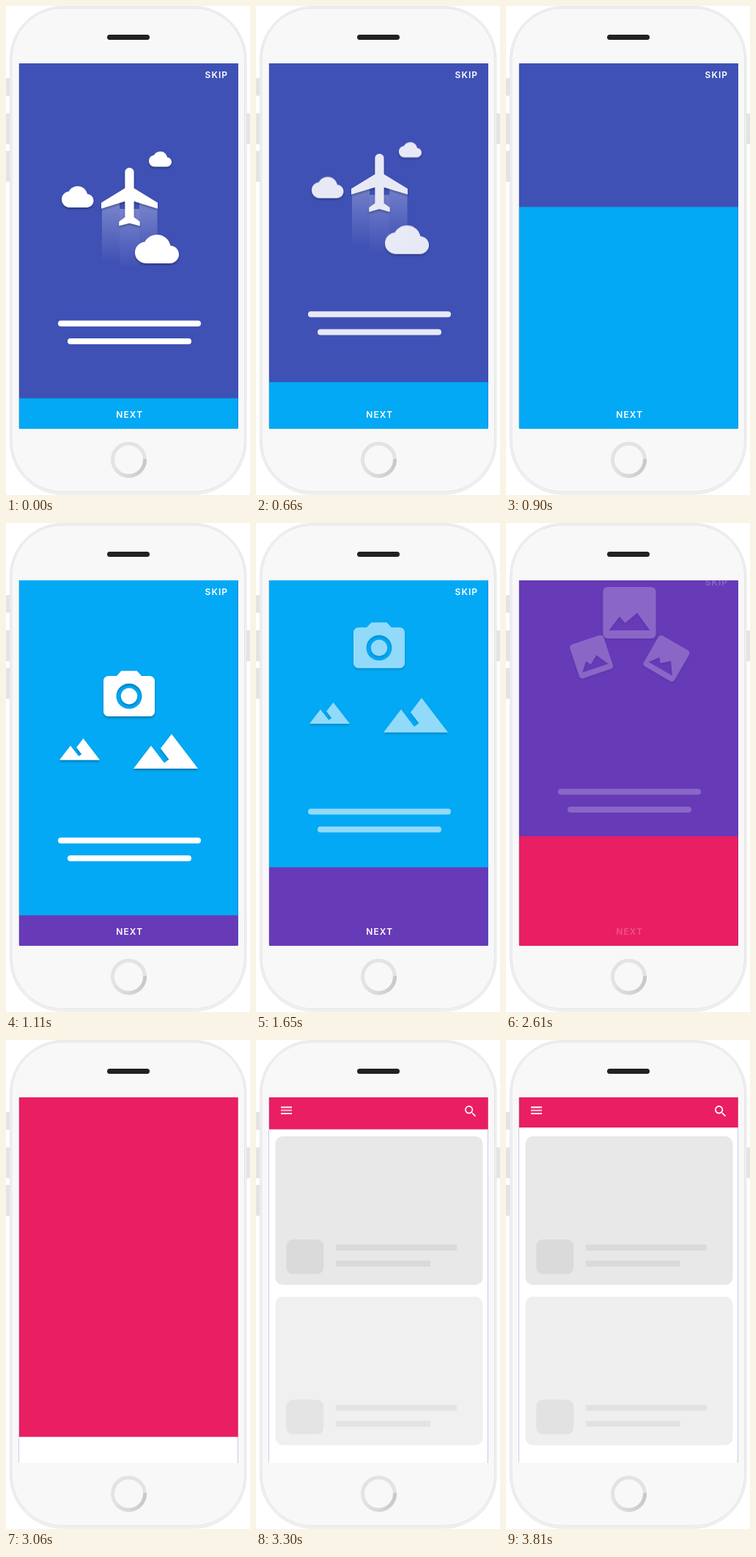
Animation of 333 by 665 pixels, one loop 4.43 s. Source, as an HTML page:

```html
<!DOCTYPE html>
<html lang="en">
<head>
<meta charset="utf-8">
<title>Onboarding</title>
<style>
  html, body { margin: 0; width: 100%; height: 100%; overflow: hidden; background: #fff; }
  svg { display: block; width: 100vw; height: 100vh; }
  text { font: 600 12px Inter, sans-serif; letter-spacing: 1.1px; fill: #fff; }
  .part { fill: #fff; }
</style>
</head>
<body>
<svg viewBox="0 0 333 665">
  <defs>
    <clipPath id="screen"><path d="M17.5 78H317V573q0 2-2 2H19.500q-2 0-2-2z"/></clipPath>
    <linearGradient id="trail" x1="0" y1="0" x2="0" y2="1">
      <stop offset="0" stop-color="#fff" stop-opacity=".3"/>
      <stop offset="1" stop-color="#fff" stop-opacity="0"/>
    </linearGradient>
    <linearGradient id="ring">
      <stop offset="0" stop-color="#e2e2e2"/>
      <stop offset="1" stop-color="#c9c9c9"/>
    </linearGradient>
    <filter id="shade" x="-20%" y="-20%" width="140%" height="150%">
      <feDropShadow dx="0" dy="2" stdDeviation="1.6" flood-color="#000" flood-opacity=".32"/>
    </filter>
    <path id="cloud" d="M19.35 10.04C18.67 6.59 15.64 4 12 4 9.11 4 6.6 5.64 5.35 8.04 2.34 8.36 0 10.91 0 14c0 3.31 2.69 6 6 6h13c2.76 0 5-2.24 5-5 0-2.64-2.05-4.78-4.65-4.96z"/>
    <path id="plane" d="M21 16v-2l-8-5V3.5c0-.83-.67-1.5-1.5-1.5S10 2.67 10 3.500V9l-8 5v2l8-2.500V19l-2 1.500V22l3.500-1 3.500 1v-1.500L13 19v-5.500l8 2.500z"/>
    <path id="camera" fill-rule="evenodd" d="M9 2L7.17 4H4c-1.1 0-2 .9-2 2v12c0 1.1.9 2 2 2h16c1.1 0 2-.9 2-2V6c0-1.1-.9-2-2-2h-3.17L15 2H9zm3 15c-2.76 0-5-2.24-5-5s2.24-5 5-5 5 2.240 5 5-2.240 5-5 5zM12 8.8a3.200 3.200 0 1 0 .01 0z"/>
    <path id="hills" d="M14 6l-3.750 5 2.850 3.800-1.600 1.200C9.810 13.750 7 10 7 10l-6 8h22L14 6z"/>
    <path id="photo" fill-rule="evenodd" d="M-29-35H29q7 0 7 7V28q0 7-7 7H-29q-7 0-7-7V-28q0-7 7-7zM-28 24H28L10.500 0-6 14-13.500 5z"/>
  </defs>

  <g fill="#e4e4e4">
    <rect x="0" y="98" width="7" height="24" rx="1"/>
    <rect x="0" y="146" width="7" height="42" rx="1"/>
    <rect x="0" y="197" width="7" height="42" rx="1"/>
    <rect x="326" y="146" width="7" height="42" rx="1"/>
  </g>
  <rect x="5.500" y=".5" width="322.500" height="663.500" rx="72" fill="#f1f1f1" stroke="#e6e6e6"/>
  <rect x="8" y="3" width="317.500" height="657.500" rx="69" fill="#f8f8f8" stroke="#e4e4e4"/>
  <rect x="138" y="39" width="58" height="7" rx="3.500" fill="#232122"/>
  <g fill="none" stroke-width="5">
    <circle cx="167.500" cy="617" r="22" stroke="#e3e3e3"/>
    <path d="M189.500 616A22 22 0 0 1 149 629" stroke="url(#ring)"/>
  </g>

  <g clip-path="url(#screen)">
    <rect x="17.500" y="78" width="300" height="497" fill="#3f51b5"/>
    <rect id="page" x="18" y="78" width="298.700" height="497"/>
    <g id="feed"></g>
    <g id="old"></g>
    <rect id="bar" x="18" width="298.700"/>
    <g id="fresh"></g>
    <rect id="nextBar" x="18" width="298.700"/>
    <text id="skip" x="271.500" y="97.500">SKIP</text>
    <text id="next" x="150.300" y="559.500">NEXT</text>
    <g id="icons" fill="#fff">
      <path d="M34 90.500h15v2h-15zM34 99h15v2h-15z"/>
      <path d="M34 94.700h15v2h-15z" opacity=".8"/>
      <path transform="translate(282.500 86.700) scale(.86)" d="M15.500 14h-.79l-.28-.27C15.410 12.590 16 11.110 16 9.500 16 5.910 13.090 3 9.500 3S3 5.910 3 9.500 5.910 16 9.500 16c1.610 0 3.090-.59 4.230-1.570l.27.28v.79l5 4.990L20.490 19l-4.990-5zm-6 0C7.010 14 5 11.990 5 9.500S7.010 5 9.500 5 14 7.010 14 9.500 11.990 14 9.500 14z"/>
    </g>
  </g>
</svg>
<script>
const LOOP = 4430, TOP = 78, BOTTOM = 575, REST = 533.5, SPAN = 640;
const STARTS = [472, 1362, 2270];
const COLORS = ['#3f51b5', '#03a9f4', '#673ab7', '#e91e63'];
// exit distance, exit power and entry distance of each layer
const LAYERS = { main: [113, 1.14, 40], side: [89, 1.25, 30], line: [64.5, 1.05, 20] };

const $ = id => document.getElementById(id);
const clamp = v => Math.max(0, Math.min(1, v));
const smooth = v => { v = clamp(v); return v * v * (3 - 2 * v); };
const set = (el, attrs) => { for (const k in attrs) el.setAttribute(k, attrs[k]); };

function bezier(x1, y1, x2, y2) {
  const at = (a, b, s) => 3 * a * s * (1 - s) ** 2 + 3 * b * s * s * (1 - s) + s ** 3;
  return x => {
    if (x <= 0 || x >= 1) return clamp(x);
    let lo = 0, hi = 1;
    for (let i = 0; i < 24; i++) {
      const m = (lo + hi) / 2;
      if (at(x1, x2, m) < x) lo = m; else hi = m;
    }
    return at(y1, y2, lo);
  };
}
const climb = bezier(0.9, 0, 0.5, 1);
const retract = bezier(0.25, 0.1, 0.25, 1);

const part = (layer, body) => `<g class="part" data-layer="${layer}">${body}</g>`;
const icon = (id, x, y, sx, sy = sx, turn = 0) =>
  `<g filter="url(#shade)"><use href="#${id}" transform="translate(${x} ${y}) rotate(${turn}) scale(${sx} ${sy})"/></g>`;
const box = (x, y, w, h, r, fill) =>
  `<rect x="${x}" y="${y}" width="${w}" height="${h}" rx="${r}" fill="${fill}"/>`;
const trail = (x, y, w, h) => box(x, y, w, h, 0, 'url(#trail)');

const lines = part('line', box(71, 427.7, 195, 8, 4, '#fff') + box(84, 452, 169, 8, 4, '#fff'));
const scenes = [
  part('main', trail(131, 268, 24, 80) + trail(155, 276, 27, 80) + trail(182, 268, 24.5, 78) +
    icon('plane', 121.9, 212.2, 4.05, 3.95)) +
  part('side', icon('cloud', 195, 192.7, 1.29) + icon('cloud', 76, 237.7, 1.81) +
    icon('cloud', 176, 301.3, 2.5, 2.43)),
  part('main', icon('camera', 126, 194.1, 3.5, 3.45)) +
  part('side', icon('hills', 70.5, 278.6, 2.5, 2.42) + icon('hills', 170, 263.5, 4, 3.92)),
  part('side', icon('photo', 116.6, 273.7, 0.67, 0.69, -18.5) + icon('photo', 219, 276, 0.67, 0.69, 30)) +
  part('main', icon('photo', 168.5, 238.2, 1))
].map(s => s + lines);

const card = (y, back, front) => '<g>' + box(26.5, y, 283, 202, 10, back) +
  box(41.3, y + 140.3, 51, 47, 9, front) + box(109, y + 147.3, 165, 8, 0, front) +
  box(109, y + 169, 129, 8, 0, front) + '</g>';
$('feed').innerHTML = card(131, '#e8e8e8', '#dadada') + card(349, '#efefef', '#e3e2e2');

function show(holder, n) {
  if (holder.dataset.n === String(n)) return;
  holder.dataset.n = n;
  holder.innerHTML = scenes[n] || '';
}

function place(holder, opacity, shift) {
  for (const p of holder.children) {
    set(p, { transform: `translate(0 ${shift(LAYERS[p.dataset.layer])})`, opacity });
  }
}

function strip(el, top, bottom, fill) {
  set(el, { y: top, height: Math.max(0, bottom - top), fill });
}

function draw(t) {
  let n = 0;
  while (n < 2 && t >= STARTS[n] + SPAN) n++;
  const last = n === 2, u = clamp((t - STARTS[n]) / SPAN);
  const y = climb(u), q = y / 0.23;
  const fade = clamp(1 - 0.75 * q ** 1.17);
  const enter = last ? 0 : smooth((u - 0.7) / 0.3);
  const feed = last && t > 3000;

  show($('old'), n);
  show($('fresh'), last ? -1 : n + 1);
  place($('old'), fade, ([far, pow]) => -far * q ** pow);
  place($('fresh'), enter, ([, , rise]) => rise * (1 - enter));

  const close = feed ? retract((t - 3035) / 295) : 0;
  set($('page'), { fill: feed ? '#fff' : COLORS[n] });
  strip($('bar'), REST - (REST - TOP) * y, BOTTOM - 456 * close, COLORS[n + 1]);
  strip($('nextBar'), BOTTOM - (BOTTOM - REST) * enter, BOTTOM, COLORS[n + 2] || 'none');

  const label = last ? fade : 1;
  set($('skip'), { opacity: label, transform: `translate(0 ${last ? -12 * q : 0})` });
  set($('next'), { opacity: label });

  const cards = $('feed').children;
  set(cards[0], { opacity: smooth((t - 3110) / 200) });
  set(cards[1], { opacity: smooth((t - 3150) / 180) });
  set($('icons'), { opacity: smooth((t - 3150) / 180) });
}

const begin = performance.now();
function tick(now) {
  draw(Math.max(0, now - begin) % LOOP);
  requestAnimationFrame(tick);
}
draw(0);
requestAnimationFrame(tick);
</script>
</body>
</html>
```
